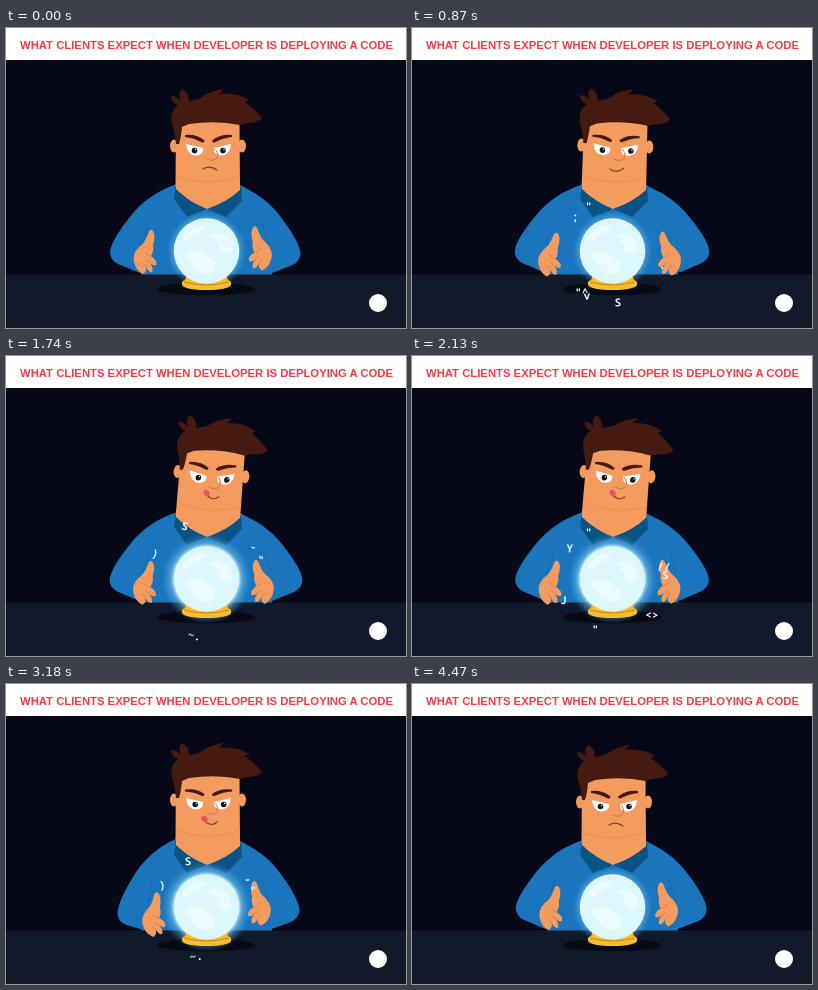
Write an HTML page that moves like this. It is 400x300 px and loops after 4.5 s.

```html
<!DOCTYPE html>
<html lang="en">
<head>
<meta charset="utf-8">
<title>Crystal ball</title>
<style>
html, body { margin: 0; width: 100%; height: 100%; overflow: hidden; background: #080918; }
svg { display: block; width: 100%; height: 100%; }
.title { font: 700 11.3px "Liberation Sans", Arial, sans-serif; fill: #fa3a40; text-anchor: middle; }
.glyph { font: 700 11px "Noto Sans Mono", monospace; fill: #e4f7ff; text-anchor: middle; dominant-baseline: central; }
.skin { fill: #f49b60; }
.hair { fill: #451a10; }
.crease { fill: none; stroke: #d17a43; stroke-linecap: round; }
</style>
</head>
<body>
<svg viewBox="0 0 400 300">
  <defs>
    <radialGradient id="halo">
      <stop offset=".7" stop-color="#d9f6ff"/>
      <stop offset=".8" stop-color="#7cc9f2" stop-opacity=".5"/>
      <stop offset="1" stop-color="#3f9fe0" stop-opacity="0"/>
    </radialGradient>
    <g id="sleeve">
      <path fill="#1b75bc" d="M172 156Q142 165 123 190Q105 213 104 224Q104 232 112 236L134 245L150 234V180Z"/>
      <path fill="none" stroke="#1869aa" d="M143 194L136 216"/>
    </g>
    <g id="hand">
      <path class="skin" d="M128 234Q126 226 133 219Q139 215 142 206Q144 200 147 203Q150 208 147 217Q148 223 145 228Q152 233 150 237Q147 238 144 235Q148 241 146 244Q143 245 140 239Q141 244 137 246Q130 243 128 234Z"/>
      <path class="crease" stroke-width=".7" d="M145 228Q141 228 139 224M144 235L140 232M140 239L137 235"/>
    </g>
  </defs>

  <rect width="400" height="300" fill="#080918"/>
  <rect y="246.500" width="400" height="54" fill="#101a2b"/>
  <rect width="400" height="32" fill="#fff"/>
  <text class="title" x="200.5" y="20.5">WHAT CLIENTS EXPECT WHEN DEVELOPER IS DEPLOYING A CODE</text>
  <circle cx="372" cy="275" r="9" fill="#fff"/>
  <ellipse cx="200" cy="261" rx="49" ry="6.500" fill="#080b14"/>

  <path fill="#1b75bc" d="M171 156Q156 161 147 172L134 214L135 246.500H266V214L253 172Q245 162 234 157Z"/>
  <g id="armL"><use href="#sleeve"/><g id="handL"><use href="#hand"/></g></g>
  <g transform="matrix(-1 0 0 1 400 0)">
    <g id="armR"><use href="#sleeve"/><g id="handR"><use href="#hand"/></g></g>
  </g>
  <path fill="#0b5383" d="M170 157L168 171L181 189L201 181L220 189L236 173L235 159Z"/>
  <path class="skin" d="M170 155V161Q183 174 201 181Q221 174 234 162V155Z"/>

  <g id="head">
    <g class="skin">
      <ellipse cx="168" cy="118" rx="4" ry="6.500"/>
      <ellipse cx="236" cy="118" rx="4" ry="6.500"/>
      <path d="M170 92L169.500 158Q183 167 202 167Q221 167 234 159L233.500 92Z"/>
    </g>
    <path class="crease" stroke-opacity=".35" d="M171 149Q201 159 232 149"/>
    <path class="hair" d="M170 116Q169 104 166 96Q163 84 172 77Q165 74 165 68Q171 68 175 73Q171 65 176 61Q183 64 183 73Q193 72 199 67Q208 62 218 61Q215 64 213 66Q230 64 243 72Q240 73 239 74Q250 82 256 90Q252 95 240 95L234 97Q210 92 183 96L176 99Q175 110 173 116Z"/>
    <path fill="#fff" d="M180 116L197 120Q198 127 190 127.500Q181 127 180 116ZM225 116L208 120Q207 127 215 127.500Q224 127 225 116Z"/>
    <g id="pupils" fill="#17151c">
      <circle cx="188.500" cy="122.500" r="2.800"/><circle cx="217" cy="122.500" r="2.800"/>
      <path stroke="#fff" stroke-linecap="round" stroke-width="1.300" d="M189.500 121.500h.1M218 121.500h.1"/>
    </g>
    <path id="browL" class="hair" d="M179 107Q191 106 198.500 112.500Q198 115.500 195 114Q188 110 179 109Z"/>
    <path id="browR" class="hair" d="M226 107Q214 106 206 112.500Q206.500 115.500 209.500 114Q217 110 226 109Z"/>
    <path class="crease" d="M209 121Q213 125 211 130Q207 134 201 131"/>
    <path id="mouth" fill="none" stroke="#8a4023" stroke-width="1.200" stroke-linecap="round"/>
    <g id="tongue"><ellipse rx="3.400" ry="2.700" transform="rotate(40)" fill="#e4565a"/></g>
  </g>

  <g id="glyphs"></g>
  <circle id="glow" cx="200.500" cy="223" fill="url(#halo)"/>
  <path fill="#f5bd2f" d="M181 247H220L222 252Q226 253 225 257Q222 262 200.500 262Q179 262 176 257Q175 253 179 252Z"/>
  <path fill="none" stroke="#c78218" d="M178 254Q200 260 223 254"/>
  <circle cx="200.500" cy="223" r="32.800" fill="#dcf7fc"/>
  <path id="clouds" fill="#f5fdff" opacity=".6" d="M176 211Q184 196 201 198Q196 206 187 207Q184 216 176 211ZM204 207Q216 201 225 214Q229 225 220 226Q211 224 213 217ZM179 228Q192 217 202 229Q214 234 207 244Q194 249 188 239Z"/>
</svg>

<script>
const LOOP = 4500, BURST_GAP = 590, BURST_SPAN = 700;
const $ = id => document.getElementById(id);
const place = (id, transform) => $(id).setAttribute('transform', transform);

// 0 to 1 between two times
function ramp(t, from, to) {
  const u = Math.min(1, Math.max(0, (t - from) / (to - from)));
  return u * u * (3 - 2 * u);
}
// Soft pulse around a centre, wrapping with the loop
function bump(t, centre, width) {
  const d = Math.abs((t - centre + LOOP * 1.5) % LOOP - LOOP / 2) / width;
  return d < 1 ? (1 + Math.cos(Math.PI * d)) / 2 : 0;
}

// Code symbols thrown out of the ball, each with its direction in degrees
const sets = [
  [['Y', -144], ['"', -117], ['J', 157], ['S', -5], ['//', -14], ['<>', 42], ['"', 109]],
  [[';', -137], ['"', -118], ['"^', 127], ['v', 120], ['S', 84], ['.', 15]],
  [['S', -112], ['-', -35], ['"', -20], ['~.', 102], [')', -153]],
];
const bursts = [...sets, ...sets].map((set, i) => ({
  start: 60 + i * BURST_GAP,
  parts: set.map(([char, degrees]) => {
    const el = document.createElementNS('http://www.w3.org/2000/svg', 'text');
    el.setAttribute('class', 'glyph');
    el.textContent = char;
    $('glyphs').append(el);
    return { el, angle: degrees * Math.PI / 180 };
  }),
}));

function drawBursts(t) {
  for (const { start, parts } of bursts) {
    const p = (t - start) / BURST_SPAN, r = 46 + 16 * p;
    for (const { el, angle } of parts) {
      el.setAttribute('opacity', Math.max(0, Math.min(1, 7 * p, 4 * (1 - p))));
      el.setAttribute('transform',
        `translate(${200.5 + r * Math.cos(angle)} ${223 + r * Math.sin(angle)}) rotate(${40 * p - 15})`);
    }
  }
}

function draw(t) {
  const wave = Math.sin(t / LOOP * 8 * Math.PI);
  const tilt = 4.5 * (ramp(t, 600, 1250) - ramp(t, 2250, 2950));
  const lift = 2 * (ramp(t, 2300, 2950) - ramp(t, 3850, 4400)) + bump(t, 300, 300);
  const smile = ramp(t, 560, 760) - ramp(t, 4150, 4380);
  const lick = ramp(t, 1130, 1280) - ramp(t, 4050, 4200);
  const glow = ramp(t, 900, 1300) - ramp(t, 3900, 4400);

  place('head', `translate(0 ${-lift}) rotate(${tilt} 202 163)`);
  place('pupils', `translate(${smile * 0.7} 0)`);
  place('browL', `rotate(${-3 * smile} 189 110)`);
  place('browR', `rotate(${3 * smile} 216 110)`);
  $('mouth').setAttribute('d', `M197 ${141 - 4 * lick}Q204 ${137 + 9 * smile} 211 ${142 - 2 * smile}`);
  place('tongue', `translate(198.5 137) scale(${lick})`);

  const reach = bump(t, 3080, 480), rest = bump(t, 0, 700);
  place('armL', `rotate(${-1.3 * wave - 9 * reach} 160 165)`);
  place('handL', `translate(0 ${3 - 3 * rest + 2 * reach})`);
  place('armR', `rotate(${-1.3 * wave - 4 * reach - 1.5 * rest} 160 165)`);
  place('handR', `translate(5 ${2 - 6 * rest - 8 * reach})`);

  $('glow').setAttribute('r', 40 + 5 * glow);
  place('clouds', `translate(${wave} 0)`);
  drawBursts(t);
}

function tick() {
  draw(performance.now() % LOOP);
  requestAnimationFrame(tick);
}
tick();
</script>
</body>
</html>
```
